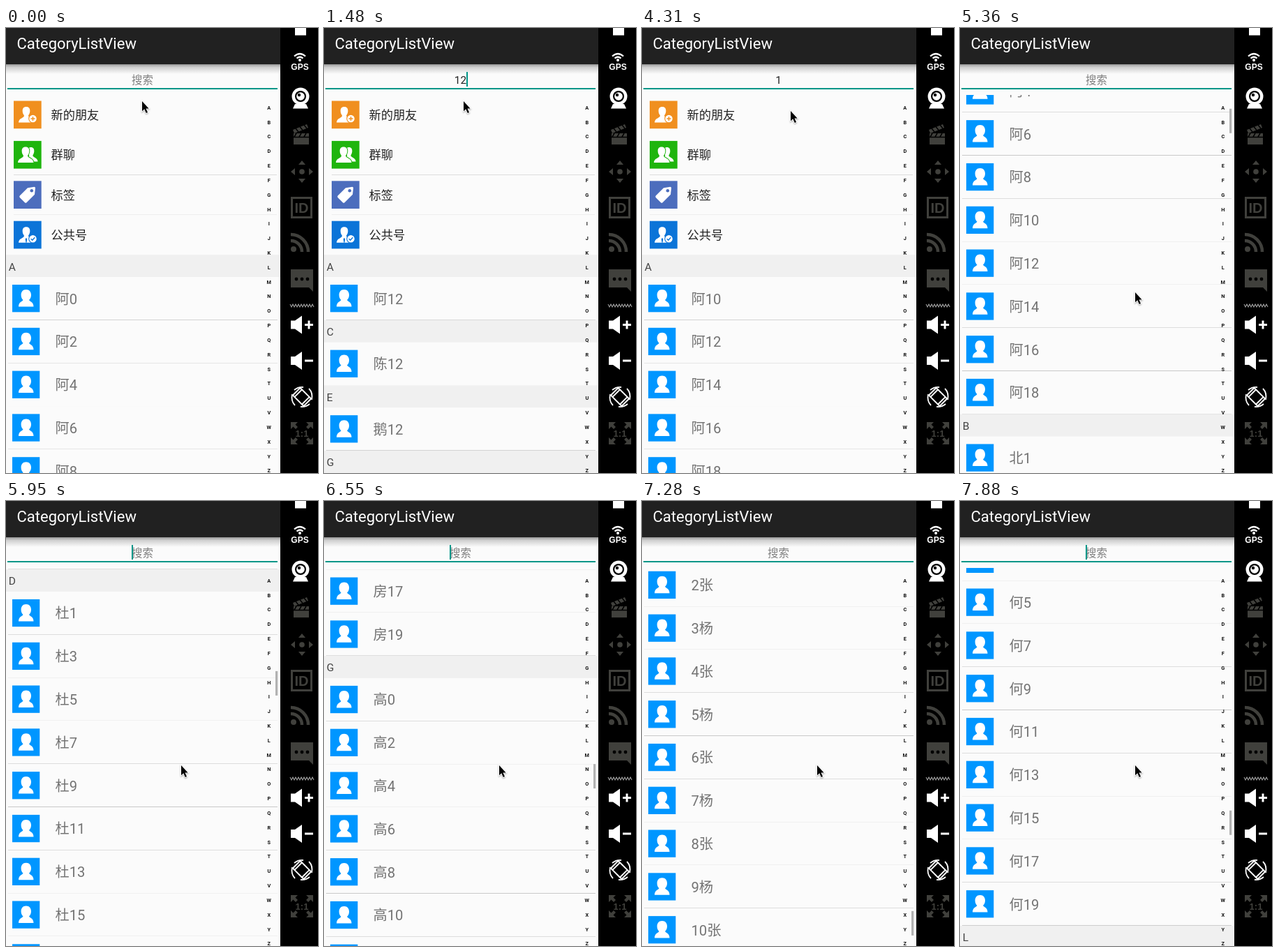
An HTML page with a canvas for the animation above (8 s loop, 447 px wide and 638 px high).

```html
<!DOCTYPE html>
<html lang="zh-CN">
<head>
<meta charset="utf-8">
<title>CategoryListView</title>
<style>
html, body { margin: 0; width: 100%; height: 100%; overflow: hidden; background: #000; }
canvas { display: block; }
</style>
</head>
<body>
<canvas id="stage" width="447" height="638" lang="zh-CN"></canvas>
<script>
const ctx = document.getElementById('stage').getContext('2d');
const LOOP = 8000, W = 393, H = 638;
const LIST_TOP = 96, FIRST_HEAD = 325.2, ROW = 61.8, HEAD = 31.8, MENU_ROW = 57.4;
const PAPER = '#fbfbfb', TEAL = '#009688', DIM = '#40403c';
const FONT = 'Roboto, "Noto Sans CJK SC", "Noto Sans CJK", sans-serif';

// Contacts: each letter holds either the even or the odd numbers, "#" holds all.
const range = Array.from({ length: 20 }, (_, i) => i);
const sections = [...'ABCDEFGHLW'].map((letter, k) => ({
  letter,
  names: range.filter(i => i % 2 === k % 2).map(i => '阿北陈杜鹅房高何李王'[k] + i)
}));
sections.push({ letter: '#', names: range.map(i => i + '张杨'[i % 2]) });

// Timeline
const typing = [[0, '', ''], [590, '1', ''], [740, '1', '1'], [1480, '12', '12'],
  [1780, '123', '123'], [2970, '12', '12'], [3860, '1', '1'], [4610, '', '']];
const caretHidden = [[0, 590], [1180, 1480], [2370, 2820], [3570, 3860],
  [4310, 4610], [5060, 5510], [6100, 6550], [7000, 7580]];
const pointerPath = [[0, 194, 105], [150, 199, 105], [2220, 202, 108], [2370, 205, 111],
  [2520, 208, 114], [2670, 210, 117], [2820, 212, 119], [4910, 254, 330], [5060, 250, 379]];
const scrollKeys = [[0, 421.3], [4, 2176.5], [8, 4001.9], [13, 6888.9], [14, 6900], [17, 4914.7]];
const SCROLL_START = 5350, SCROLL_STEP = 148.2;

const latest = (steps, t) => steps.filter(s => s[0] <= t).pop();

function scrollAt(t) {
  const step = Math.floor((t - SCROLL_START) / SCROLL_STEP);
  if (step < 0) return 0;
  const next = scrollKeys.findIndex(k => k[0] >= step);
  if (next <= 0) return scrollKeys[0][1];
  const [a, from] = scrollKeys[next - 1], [b, to] = scrollKeys[next];
  return from + (to - from) * (step - a) / (b - a);
}

// Drawing helpers
function rect(x, y, w, h, color) {
  ctx.fillStyle = color;
  ctx.fillRect(x, y, w, h);
}
function text(str, x, y, size, color, align = 'left', weight = 400, family = FONT) {
  ctx.font = `${weight} ${size}px ${family}`;
  ctx.textAlign = align;
  ctx.fillStyle = color;
  ctx.fillText(str, x, y);
}
function fill(d, color = '#fff') {
  ctx.fillStyle = color;
  ctx.fill(new Path2D(d));
}
function stroke(d, color = '#fff', width = 2) {
  ctx.strokeStyle = color;
  ctx.lineWidth = width;
  ctx.stroke(new Path2D(d));
}
function disc(x, y, r, color = '#fff') {
  ctx.beginPath();
  ctx.arc(x, y, r, 0, 7);
  ctx.fillStyle = color;
  ctx.fill();
}
function at(x, y, draw) {
  ctx.save();
  ctx.translate(x, y);
  draw();
  ctx.restore();
}

// Hairline sampled at pixel centres, so it fades with its sub-pixel position.
function hairline(x, y, w, strength = 1) {
  const row = Math.floor(y), alpha = 1 - Math.abs(row + 0.5 - y) / 0.511;
  if (alpha > 0) rect(x, row, w, 1, `rgba(0,0,0,${0.2 * alpha * strength})`);
}

const PERSON = 'M19.8 7C24.5 7 27 10.5 27 15C27 18.5 25.5 20.5 24 22C25 24.5 30.5 24.5 30.5 31.5H9' +
  'C9 24.5 14.5 24.5 15.5 22C14 20.5 12.6 18.5 12.6 15C12.6 10.5 15 7 19.8 7Z';
const FRIEND = 'M18 8.5C22 8.5 23.5 11 23.3 15C23 18 22 19.5 21 21C21 25 29 24 29.5 31H7' +
  'C7.5 24 15 25 15 21C14 19.5 12.8 18 12.7 15C12.5 11 14 8.5 18 8.5Z';

function contactIcon() {
  rect(0, 0, 39.3, 39.3, '#0096ff');
  fill(PERSON);
}
function badge(color, mark) {
  disc(27.5, 25.5, 6.3, color);
  disc(27.5, 25.5, 5.2);
  stroke(mark, color, 1.4);
}
const menu = [
  ['新的朋友', '#f08f1f', c => { fill(FRIEND); badge(c, 'M24.5 25.5H30.5M27.5 22.5V28.5'); }],
  ['群聊', '#1fb50d', c => {
    at(9.5, 1.2, () => { ctx.scale(0.85, 0.92); fill(FRIEND); });
    at(-1, 0, () => { stroke(FRIEND, c, 2); fill(FRIEND); });
  }],
  ['标签', '#4c6dbd', c => {
    fill('M20 10L29.5 8.5Q31 8.5 31 10L30 19.5L18.5 31Q17 32 16 31L8.7 23.8Q7.8 22.5 8.7 21.3Z');
    disc(25.8, 14, 2.3, c);
  }],
  ['公共号', '#0b74d8', c => {
    fill(FRIEND);
    fill('M18 24L19.3 26L18.5 31H17.5L16.7 26Z', c);
    badge(c, 'M24.8 25.5L26.8 27.6L30.3 23.6');
  }]
];

function drawMenu(scroll) {
  menu.forEach(([label, color, symbol], i) => {
    const y = 104.5 + i * MENU_ROW - scroll;
    if (y < 40) return;
    at(11, y, () => {
      rect(0, 0, 39.7, 39.7, color);
      symbol(color);
    });
    text(label, 64.5, y + 26.5, 17.2, '#222');
    if (i === 1 || i === 2) hairline(11, 210.5 + (i - 1) * 57.3 - scroll, 377, 0.6);
  });
}

function drawContacts(filter, scroll) {
  let y = FIRST_HEAD - scroll;
  const visible = h => y + h > LIST_TOP && y < H;
  for (const { letter, names } of sections) {
    const found = names.filter(n => n.includes(filter));
    if (!found.length) continue;
    if (visible(HEAD)) {
      rect(0, y, W, HEAD, '#f0f0f0');
      text(letter, 3.7, y + 22.3, 15.5, '#444');
    }
    y += HEAD;
    for (const name of found) {
      if (visible(ROW)) {
        at(9, y + 11, contactIcon);
        text(name, 70.5, y + 38.5, 20.2, '#737373');
        hairline(3, y + ROW - 0.4, 386);
      }
      y += ROW;
    }
  }
}

function drawApp(t) {
  const [, query, filter] = latest(typing, t);
  const scroll = scrollAt(t);
  rect(0, 0, W, H, PAPER);

  ctx.save();
  ctx.beginPath();
  ctx.rect(0, LIST_TOP, W, H - LIST_TOP);
  ctx.clip();
  drawMenu(scroll);
  drawContacts(filter, scroll);
  if (scroll) rect(386, 85 + 0.073 * scroll, 3.3, 35, '#b2b2b2');
  ctx.restore();

  for (let i = 0; i < 26; i++) {
    text(String.fromCharCode(65 + i), 376.8, 116.7 + i * 20.83, 7.3, '#111', 'center', 700);
  }

  const shadow = ctx.createLinearGradient(0, 51, 0, 66);
  shadow.addColorStop(0, '#8c8c8c');
  shadow.addColorStop(0.35, '#cfcfcf');
  shadow.addColorStop(1, PAPER);
  rect(0, 51, W, 15, shadow);
  rect(0, 0, W, 52, '#212121');
  text('CategoryListView', 15.5, 30, 22, '#fff');

  text(query || '搜索', 195.5, 79.7, 15.4, query ? '#222' : '#808080', 'center');
  const caretX = query ? 195.5 + ctx.measureText(query).width / 2 : 180;
  if (!caretHidden.some(([a, b]) => t >= a && t < b)) rect(Math.round(caretX), 63, 2, 21, TEAL);
  rect(2, 86, 387, 2, TEAL);
}

function speaker(y, sign) {
  at(408, y, () => {
    fill('M0 -6H6L16 -13V13L6 6H0Z');
    stroke(sign, '#fff', 3);
  });
}

function drawToolbar() {
  const ARIAL = '"Liberation Sans", Arial, sans-serif';
  rect(W, 0, 54, H, '#000');
  rect(414, 0, 16, 10.5, '#fff');

  disc(421, 46, 2);
  stroke('M416.5 43.5Q421 39.5 425.5 43.5M413 40.5Q421 33.5 429 40.5', '#fff', 2.2);
  text('GPS', 421, 59.5, 12, '#fff', 'center', 700, ARIAL);

  disc(422, 98, 12.5);
  disc(422, 98, 8, '#000');
  disc(422, 98, 5.8);
  disc(420, 96, 2.2, '#000');
  fill('M414 109H430L433 115.5H411Z');

  fill('M412 151H434V167H412ZM411 146L431 138L433 143L413 151Z', DIM);
  stroke('M415 144L419 149M421 141.5L425 146.5M427 139L431 144M416 151L413 156M423 151L420 156M430 151L427 156M412 156.5H434', '#000', 1.5);

  disc(424, 206, 3.8, DIM);
  fill('M424 190L429 196H419ZM424 222L429 216H419ZM408 206L414 201V211ZM440 206L434 201V211Z', DIM);

  stroke('M409.5 243.5H437.5V271.5H409.5Z', DIM, 3);
  text('ID', 423.5, 265, 20, DIM, 'center', 700, ARIAL);

  disc(412, 317, 4, DIM);
  stroke('M408 305A16 16 0 0 1 424 321M408 296A25 25 0 0 1 433 321', DIM, 4.5);

  fill('M408 346H440V378L434 372H408Z', DIM);
  for (const x of [416, 424, 432]) disc(x, 360, 2.4, '#000');

  let zigzag = 'M407 396';
  for (let i = 1; i < 18; i++) zigzag += `L${407 + i * 2} ${i % 2 ? 400 : 396}`;
  stroke(zigzag, '#999', 1.1);

  speaker(425.5, 'M20 0H32M26 -6V6');
  speaker(477, 'M20 0H32');

  at(424, 529, () => {
    ctx.rotate(-Math.PI / 4);
    stroke('M-6 -11H6Q7.5 -11 7.5 -9.5V9.5Q7.5 11 6 11H-6Q-7.5 11 -7.5 9.5V-9.5Q-7.5 -11 -6 -11ZM-7 -7.5H7M-7 7.5H7', '#fff', 2);
  });
  stroke('M413 519Q419 514 426 515M435 539Q429 544 422 543M410 525Q408 535 414 541M438 533Q440 523 434 517', '#fff', 1.8);

  at(424, 581, () => {
    for (const [sx, sy] of [[1, 1], [-1, 1], [1, -1], [-1, -1]]) {
      ctx.save();
      ctx.scale(sx, sy);
      fill('M16 16H6L9.5 12.5L6 9L9 6L12.5 9.5L16 6Z', DIM);
      ctx.restore();
    }
  });
  text('1:1', 424, 586, 13, DIM, 'center', 700, ARIAL);
}

function drawPointer(t) {
  const [, x, y] = latest(pointerPath, t);
  const arrow = 'M1 0V14.2L4.2 11.2L6.8 17L9 16L6.5 10.4H10.6Z';
  at(x, y, () => {
    ctx.save();
    ctx.shadowColor = 'rgba(0,0,0,.35)';
    ctx.shadowBlur = 2;
    ctx.shadowOffsetY = 1;
    stroke(arrow, '#fff', 1.8);
    ctx.restore();
    fill(arrow, '#000');
  });
}

function frame(now) {
  const t = now % LOOP;
  drawApp(t);
  drawToolbar();
  drawPointer(t);
  requestAnimationFrame(frame);
}
requestAnimationFrame(frame);
</script>
</body>
</html>
```
